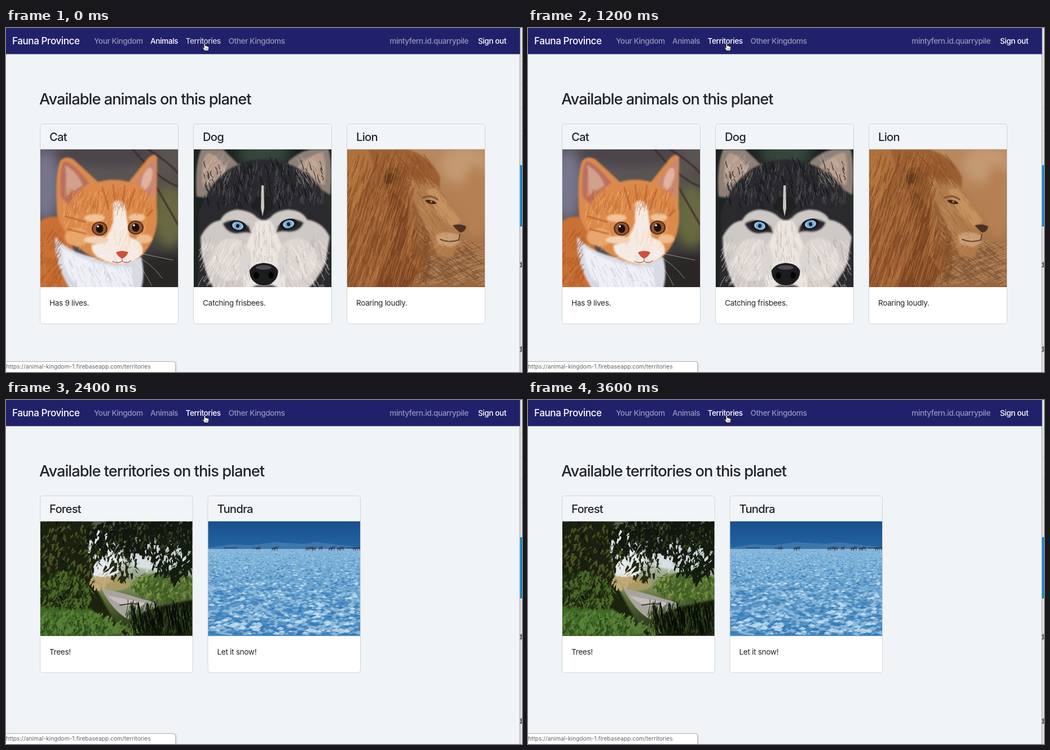
Recreate the animation shown at these times as an HTML page. Size 915x612 px, loop 3.8 s.

```html
<!DOCTYPE html>
<html lang="en">
<head>
<meta charset="utf-8">
<title>Fauna Province</title>
<style>
  html, body { margin: 0; width: 100%; height: 100%; overflow: hidden; background: #f0f4f7; }
  #stage { display: block; width: 915px; height: 612px; }
  text { font: 13.6px Inter, "Open Sans", sans-serif; font-optical-sizing: none; letter-spacing: -.32px; fill: #212529; }
  .brand { font-size: 17px; font-weight: 500; letter-spacing: -.4px; fill: #fff; }
  .nav { font-weight: 450; letter-spacing: -.42px; fill: #fff; fill-opacity: .52; }
  .nav.hover { fill-opacity: .8; }
  .nav.active { fill-opacity: 1; }
  .headline { font-size: 27.2px; font-weight: 500; letter-spacing: -.96px; }
  .title { font-size: 20.2px; font-weight: 500; letter-spacing: -.75px; }
  .status { font-size: 10.2px; letter-spacing: .02px; fill: #5f6368; }
  .line { fill: none; stroke-linecap: round; }
</style>
</head>
<body>
<svg id="stage" viewBox="0 0 915 612" xmlns="http://www.w3.org/2000/svg"></svg>
<script>
let seed = 7;
function random(min = 0, max = 1) {
  seed = (seed * 16807) % 2147483647;
  return min + (max - min) * seed / 2147483647;
}
const repeat = (count, make) => Array.from({ length: count }, (_, i) => make(i)).join('');
const round = (...values) => values.map(v => v.toFixed(1)).join(' ');

const shape = (d, fill, extra = '') => `<path d="${d}" fill="${fill}" ${extra}/>`;
const line = (d, color, width = 1, extra = '') =>
  `<path class="line" d="${d}" stroke="${color}" stroke-width="${width}" ${extra}/>`;
const oval = (x, y, rx, ry, fill, extra = '') =>
  `<ellipse cx="${x}" cy="${y}" rx="${rx}" ry="${ry}" fill="${fill}" ${extra}/>`;
const rect = (x, y, w, h, fill, extra = '') =>
  `<rect x="${x}" y="${y}" width="${w}" height="${h}" fill="${fill}" ${extra}/>`;
const text = (x, y, cls, content, extra = '') =>
  `<text x="${x}" y="${y}" class="${cls}" ${extra}>${content}</text>`;
const soft = (content, level = 1) => `<g filter="url(#soft${level})">${content}</g>`;
const gradient = (id, stops, direction = 'x2="0" y2="1"') =>
  `<linearGradient id="${id}" ${direction}>${stops.map((color, i) =>
    `<stop offset="${i / (stops.length - 1)}" stop-color="${color}"/>`).join('')}</linearGradient>`;

// Short curved hairs starting anywhere in a box
const hairs = (count, [x, y, w, h], dx, dy, color, width = 1, extra = '') =>
  line(repeat(count, () => {
    const k = random(.5, 1.2), bend = random(-4, 4);
    return `M${round(random(x, x + w), random(y, y + h))}q${round(dx * k / 2 + bend, dy * k / 2, dx * k, dy * k)}`;
  }), color, width, extra);

// Leaf-like chips scattered around the middle of an ellipse
const leaves = (count, x, y, rx, ry, size, fill) =>
  shape(repeat(count, () => {
    const a = random(0, 6.283), r = Math.sqrt(random()), s = random(.4, 1) * size;
    const b = random(0, 6.283), c = Math.cos(b) * s, d = Math.sin(b) * s;
    return `M${round(x + Math.cos(a) * r * rx, y + Math.sin(a) * r * ry)}l${round(c, d)}l${round(d, s - c)}l${round(-c - s / 2, -d)}z`;
  }), fill);

function cat() {
  const eye = (x, y) => oval(x, y, 14, 12.5, '#5b2c19') + oval(x, y, 11.5, 10.5, '#8f5836') +
    oval(x, y, 6.5, 7.5, '#1d0f0e') + oval(x - 3, y - 4, 1.8, 1.8, '#fff');
  return rect(60, 216, 245, 245, 'url(#catBack)') +
    soft(oval(70, 280, 24, 60, '#77748c') + oval(290, 335, 30, 55, '#67693f') + oval(180, 225, 95, 22, '#4c4449') +
      oval(280, 440, 60, 38, '#2b2528'), 3) +
    line('M225 216Q270 270 305 282M252 216Q290 240 305 258M268 285L305 350', '#3a2428', 4, 'opacity=".6"') +
    soft(shape('M50 352Q72 330 98 338L150 470H50Z', '#c96f34') +
      shape('M88 372Q110 400 160 408H240Q248 440 238 470H118Q84 420 88 372Z', '#d9dbe4'), 2) +
    soft(shape('M91 335Q86 262 96 237Q105 225 120 234L163 274Q190 266 218 274L250 234Q262 220 268 230L267 318Q272 358 254 388Q232 424 190 420Q118 405 91 335Z', '#dc8a4c') +
      shape('M97 300Q94 253 102 238Q113 232 148 276Q121 291 111 315Z', '#b9705e') +
      shape('M229 276Q247 246 265 233Q266 275 262 303Q248 291 229 276Z', '#c98875') +
      shape('M105 300Q108 262 105 244Q128 257 136 280Z', '#d2a08d') +
      oval(250, 268, 8, 20, '#e2b3a0', 'transform="rotate(18 250 268)"'), 2) +
    soft(shape('M190 312Q201 302 211 315L219 372Q246 380 242 401Q224 424 192 420Q148 408 152 386Q178 384 190 345Z', '#f5ebe4') +
      oval(126, 372, 22, 16, '#e8a56c') + oval(157, 338, 18, 7, '#f0c295') + oval(232, 337, 15, 7, '#f0c295') +
      oval(160, 377, 22, 7, '#f2d2b3') + oval(245, 375, 14, 8, '#eebd8d') +
      shape('M100 390Q140 418 190 424L222 426L226 465H130Q98 430 100 390Z', '#eff0f5'), 2) +
    hairs(110, [105, 296, 150, 38], 3, -15, '#bd6328', 1.3, 'opacity=".5"') +
    hairs(110, [105, 290, 145, 100], -4, 12, '#f7c38a', 1.1, 'opacity=".5"') +
    hairs(70, [62, 358, 40, 100], -8, 13, '#a4521f', 1.6, 'opacity=".55"') +
    hairs(60, [110, 405, 112, 52], 7, 15, '#bfc5d8', 1.2, 'opacity=".55"') +
    soft(line('M171 284L182 323M190 280L193 305M211 281L207 305M228 288L216 323M106 335L140 345M110 358L142 366M251 334L260 324', '#b9602b', 3.5, 'opacity=".6"') +
      eye(166, 357) + eye(230, 355)) +
    soft(shape('M195 399Q206 394 217 399Q213 408 206 410Q199 408 195 399Z', '#cf4f3a') +
      line('M206 410V415Q198 420 189 415M206 415Q214 420 221 414', '#a5685b', 1.3)) +
    line('M187 402Q145 407 116 433M188 407Q155 425 138 456M190 411Q166 437 161 459M222 401Q256 416 277 445M221 406Q245 429 258 458M224 398L296 413', '#fff', .8, 'opacity=".6"');
}

function dog() {
  const eye = (x, y, tilt) => `<g transform="rotate(${tilt} ${x} ${y})">` + oval(x, y, 16, 9.5, '#1a1a1e') +
    oval(x, y, 10, 7, '#a6cdec') + oval(x, y, 7, 7, '#6ea9dd') + oval(x, y, 3, 3.4, '#10151e') + '</g>';
  return rect(332, 216, 246, 245, '#1d2320') +
    soft(oval(457, 222, 45, 30, '#35443a') + oval(570, 340, 15, 60, '#2b332e'), 3) +
    soft(shape('M338 300Q334 245 346 216H385L419 249L365 303Z', '#8f8077') +
      shape('M350 283Q343 239 359 222Q383 231 392 260Z', '#b79b8b') +
      shape('M492 247Q514 221 540 216H572Q580 246 575 297Z', '#8f8077') +
      shape('M513 251Q542 222 562 222Q570 249 564 280Z', '#b79b8b') +
      shape('M342 330Q367 253 421 240Q457 226 501 242Q563 261 576 334V461H340Z', '#2b2b2e'), 2) +
    hairs(190, [352, 250, 212, 68], 2, -15, '#77787a', .9, 'opacity=".5"') +
    hairs(120, [352, 244, 210, 80], -4, -14, '#111216', 1.5, 'opacity=".7"') +
    hairs(45, [345, 238, 45, 45], 8, -14, '#d8c6b8', 1, 'opacity=".5"') +
    hairs(45, [520, 238, 45, 45], -8, -14, '#d8c6b8', 1, 'opacity=".5"') +
    soft(shape('M345 372Q358 345 380 342Q389 324 412 323Q436 326 445 337L457 344L469 337Q478 325 500 323Q525 324 534 341Q562 345 574 372L566 420Q550 452 530 470H372Q346 430 345 372Z', '#cfc9c5') +
      shape('M443 345Q457 338 471 345L494 400L496 470H420L421 400Z', '#ebe4df') +
      oval(400, 412, 35, 38, '#dcd6d2') + oval(516, 412, 35, 38, '#dcd6d2') +
      shape('M384 348Q404 334 431 353L435 366Q428 362 411 366Q392 366 384 348Z', '#2c2b2e') +
      shape('M482 352Q505 332 528 346Q523 362 502 363Q486 360 479 365Z', '#2c2b2e') +
      shape('M430 470Q440 452 457 458Q476 451 488 470Z', '#5d5655'), 2) +
    soft(shape('M436 318L456 338L476 318L468 300H444Z', '#202023') +
      shape('M453 280H457L458 320L455 335L452 320Z', '#c9c5c0')) +
    hairs(90, [349, 376, 70, 82], -8, 15, '#fff8f2', 1.1, 'opacity=".5"') +
    hairs(90, [499, 376, 68, 82], 8, 15, '#fff8f2', 1.1, 'opacity=".5"') +
    hairs(55, [350, 370, 215, 85], 2, 14, '#8f8a88', 1.1, 'opacity=".4"') +
    hairs(50, [437, 355, 40, 61], 0, -12, '#aba5a3', .9, 'opacity=".5"') +
    soft(eye(411, 352, 12) + eye(501, 349, -12)) +
    soft(shape('M432 431Q439 419 457 418Q476 419 482 431Q484 445 470 455Q457 461 445 455Q431 447 432 431Z', '#1c1c1f') +
      oval(457, 426, 14, 4, '#4d494d') + oval(444, 440, 5, 6, '#050506') + oval(470, 440, 5, 6, '#050506'));
}

function lion() {
  return rect(604, 216, 246, 245, 'url(#lionBack)') +
    soft(oval(815, 245, 45, 32, '#c49a72') + oval(834, 308, 26, 65, '#b58053') + oval(778, 439, 90, 35, '#98683f'), 3) +
    hairs(150, [710, 385, 140, 73], 24, -9, '#d0a171', 1.6, 'opacity=".45"') +
    hairs(110, [715, 392, 135, 66], -18, -13, '#65442d', 1.8, 'opacity=".45"') +
    soft(shape('M594 216H711Q752 226 770 266L767 316L746 353L750 397L722 461H594Z', '#9c5e31') +
      shape('M604 216H643L653 248L628 309L610 349L604 368Z', '#ad6f3b') +
      shape('M671 266L714 325L709 401L732 435L712 461H657L690 363Z', '#834b26'), 2) +
    soft(shape('M712 269Q746 258 766 282L783 303L813 347Q820 354 814 364L806 370L805 381L796 393L794 406Q779 413 765 402L739 408Q715 375 718 329Z', '#b07a4b') +
      shape('M745 288L761 285L781 307L807 344L791 354L763 329Z', '#c4915f') +
      shape('M762 368Q784 358 804 370L803 382L789 390L766 384Z', '#c99e74') +
      shape('M719 300Q742 349 766 404L735 408Q709 365 719 300Z', '#965f36') +
      oval(678, 268, 24, 18, '#8a5429', 'transform="rotate(-30 678 268)"') +
      oval(680, 268, 12, 9, '#63391f', 'transform="rotate(-30 680 268)"'), 2) +
    soft(hairs(250, [604, 225, 125, 230], -13, 38, '#6e3c1d', 1.6, 'opacity=".5"') +
      hairs(220, [614, 218, 118, 230], -10, 34, '#c98a50', 1.3, 'opacity=".5"') +
      hairs(80, [700, 240, 60, 45], -12, -16, '#8a5229', 1.5, 'opacity=".7"') +
      hairs(70, [722, 350, 30, 85], -5, 22, '#7a4622', 1.6, 'opacity=".55"')) +
    hairs(110, [725, 296, 50, 90], 10, 13, '#d9a878', .8, 'opacity=".4"') +
    hairs(70, [728, 290, 55, 95], 8, 12, '#7f502d', .9, 'opacity=".4"') +
    soft(shape('M743 307Q755 303 764 312Q751 316 743 307Z', '#3b271b') + oval(754, 309, 2, 2, '#a37a45') +
      line('M739 302Q753 296 765 305', '#805433', 3) +
      shape('M792 351Q806 347 816 353Q815 363 805 364Q798 358 792 351Z', '#4a3226') +
      line('M805 367L803 377Q787 383 770 376', '#65432e', 2)) +
    line('M781 370L742 386M783 374L748 398M789 375L763 401', '#e4bf94', .7, 'opacity=".5"');
}

function forest() {
  return rect(60, 216, 271, 204, 'url(#forestBack)') +
    soft(oval(172, 285, 36, 32, '#e7e9ed') + oval(266, 277, 55, 25, '#d9e0e3') + oval(285, 331, 62, 24, '#5d7635') +
      oval(188, 327, 32, 13, '#aa9a62'), 2) +
    leaves(270, 285, 330, 55, 27, 7, '#3f5e26') + leaves(120, 278, 329, 55, 22, 5, '#7d9446') +
    soft(shape('M169 335Q205 342 241 354Q274 361 266 370Q243 381 216 390Q187 373 169 335Z', '#aaa4a0') +
      shape('M180 348Q220 356 251 361L235 369Q200 368 180 348Z', '#c5bebb')) +
    line('M202 365L223 362L235 363', '#3e3a38', 2) +
    soft(shape('M60 216H154L145 268L157 329L173 359L205 419H60Z', '#1b2411'), 2) +
    line('M92 216Q111 279 94 374M98 292Q159 226 229 234M154 240Q231 249 331 219', '#0d100a', 8) +
    leaves(560, 110, 260, 68, 50, 9, '#19200f') + leaves(780, 248, 238, 98, 33, 9, '#11180f') +
    leaves(230, 298, 278, 38, 42, 9, '#141c10') + leaves(95, 207, 293, 28, 28, 7, '#242a14') +
    leaves(190, 112, 270, 58, 52, 6, '#4a5222') + leaves(130, 246, 239, 85, 25, 5, '#37391c') +
    leaves(45, 168, 267, 27, 34, 5, '#e0e5e9') + leaves(75, 267, 278, 48, 24, 5, '#cad2d4') +
    leaves(230, 105, 344, 50, 38, 8, '#4c6828') + leaves(150, 100, 342, 54, 37, 6, '#243c14') +
    leaves(65, 168, 319, 20, 12, 6, '#c4a978') +
    soft(shape('M201 419L225 385L269 368L331 355V419Z', '#131b0d') +
      shape('M60 369Q113 377 150 371L211 419H60Z', '#406725'), 2) +
    leaves(330, 122, 399, 83, 24, 7, '#598137') + leaves(170, 110, 401, 75, 20, 5, '#2b4b1b') +
    leaves(70, 215, 406, 25, 14, 6, '#587b35') +
    hairs(160, [209, 378, 120, 41], 4, -25, '#354a20', 1.1) + hairs(95, [225, 384, 105, 35], -4, -25, '#080d06', 1.5);
}

function tundra() {
  // Ice chips grow towards the viewer
  const ice = (count, fill, opacity) => shape(repeat(count, () => {
    const depth = random() ** 1.15, s = 1 + depth * 6 * random(.4, 1.2);
    return `M${round(random(353, 629), 267 + depth * 151)}l${round(s * 1.2, -s * .7)}l${round(s * 1.1, s * .45)}l${round(-s * .6, s * .5)}z`;
  }), fill, `opacity="${opacity}"`);
  const deer = (x, y) => oval(x, y, 3, 1.6, '#343e56') +
    line(`M${x - 2} ${y}v4m4 -4v4m0 -4l2 -3`, '#343e56', 1);
  return rect(358, 216, 271, 204, 'url(#tundraSky)') +
    shape('M358 263L398 257L438 258L475 253L528 256L551 253L629 262V268H358Z', '#3f76ac') +
    rect(358, 265, 271, 155, 'url(#tundraSnow)') +
    ice(1000, '#3d7fb9', .6) + ice(1150, '#b3d6ec', .6) + ice(450, '#286eae', .55) + ice(300, '#d9edf8', .7) +
    line('M387 263H410M438 264H452M604 263H629', '#315174', 2) +
    [447, 474, 479, 534, 541, 546, 558, 575, 580, 590, 596, 618, 625].map((x, i) => deer(x, 263 + i % 2)).join('');
}

function card(x, width, photoHeight, title, caption, photo) {
  const bottom = 216 + photoHeight;
  return rect(x + .5, 170.5, width - 1, bottom - 170 + 65, '#fff', 'rx="4.5"') +
    shape(`M${x + 1} 216V175q0-4 4-4h${width - 10}q4 0 4 4v41z`, '#f2f5f8') +
    rect(x, 215, width, 1, '#d5dcdf') +
    `<svg x="${x + .5}" y="216" width="${width - 1}" height="${photoHeight}" viewBox="${x + .5} 216 ${width - 1} ${photoHeight}">${photo()}</svg>` +
    rect(x + .5, 170.5, width - 1, bottom - 170 + 65, 'none', 'rx="4.5" stroke="#ccd4d8"') +
    text(x + 17, 201, 'title', title) + text(x + 17, bottom + 33, '', caption);
}

const defs = `<defs>
  ${[.6, 1.8, 9].map((blur, i) => `<filter id="soft${i + 1}" x="-20%" y="-20%" width="140%" height="140%"><feGaussianBlur stdDeviation="${blur}"/></filter>`).join('')}
  ${gradient('catBack', ['#5d5765', '#5a5550', '#353337'], 'x2=".7" y2="1"')}
  ${gradient('lionBack', ['#b7885f', '#b27d50', '#8b5c38'])}
  ${gradient('forestBack', ['#4a5740', '#c6cec8', '#5e743b', '#18220f'])}
  ${gradient('tundraSky', ['#194f8d', '#2466a7', '#2466a7', '#2466a7', '#2466a7'])}
  ${gradient('tundraSnow', ['#86b8dc', '#70a8d2', '#5d99c9', '#4287c0'])}
  ${gradient('edge', ['#a9acb3', '#deddde'], 'x2="1" y2="0"')}
</defs>`;

const windowEdge = rect(911, 0, 4, 612, '#e7e5e4') + rect(910.5, 0, 2.5, 612, 'url(#edge)') +
  [59, 100, 141, 182].map(y => rect(912, y, 3, 1, '#c9c6c4')).join('') +
  rect(911.5, 244, 3.5, 109, '#1683c6') +
  `<svg x="911" y="400" width="4" height="200" viewBox="911 400 4 200">${text(907, 426, '', 'd')}${text(907, 576, '', 'd')}</svg>`;

const navbar = rect(0, 0, 911.5, 46.5, '#21216b') +
  text(11, 29, 'brand', 'Fauna Province') +
  text(156, 28, 'nav', 'Your Kingdom') +
  text(256, 28, 'nav', 'Animals', 'id="animalsLink"') +
  text(318.5, 28, 'nav', 'Territories', 'id="territoriesLink"') +
  text(394.5, 28, 'nav', 'Other Kingdoms') +
  text(820, 28, 'nav', 'mintyfern.id.quarrypile', 'text-anchor="end"') +
  text(837, 28, 'nav active', 'Sign out');

const status = rect(-4, 594, 305.5, 24, '#000', 'rx="4" opacity=".25" filter="url(#soft2)"') +
  rect(-4, 593.5, 304.5, 24, '#fff', 'rx="4" stroke="#b4b7b9"') +
  text(0, 606, 'status', 'https://animal-kingdom-1.firebaseapp.com/territories');

const pointer = shape('M351 36V28.5Q351 27 352.2 27Q353.4 27 353.4 28.5V32Q354.8 31 355.8 32.3Q357 31.7 357.9 33Q359.7 32.6 359.8 34.5V37L358.4 40.5H352.5L348.7 35.8Q348 34.4 349.2 34.2Q350.3 34.5 351 36Z',
  '#fff', 'stroke="#111" stroke-width=".9"') + line('M354 36V39M356 36V39M358 36V38.5', '#333', .6);

document.getElementById('stage').innerHTML = defs + rect(0, 0, 915, 612, '#f0f4f7') + windowEdge + navbar +
  `<g id="animalsPage">${text(59, 136, 'headline', 'Available animals on this planet') +
    card(60, 246, 245, 'Cat', 'Has 9 lives.', cat) +
    card(332, 246, 245, 'Dog', 'Catching frisbees.', dog) +
    card(604, 246, 245, 'Lion', 'Roaring loudly.', lion)}</g>` +
  `<g id="territoriesPage">${text(59, 136, 'headline', 'Available territories on this planet') +
    card(60, 271.5, 203.5, 'Forest', 'Trees!', forest) +
    card(357.5, 271.5, 203.5, 'Tundra', 'Let it snow!', tundra)}</g>` +
  status + pointer;

const LOOP = 3800, CLICK = 1200, PAGE_CHANGE = 1400;
const [animalsPage, territoriesPage, animalsLink, territoriesLink] =
  ['animalsPage', 'territoriesPage', 'animalsLink', 'territoriesLink'].map(id => document.getElementById(id));
const start = performance.now();

function render() {
  const time = (performance.now() - start) % LOOP;
  const clicked = time >= CLICK, changed = time >= PAGE_CHANGE;
  animalsLink.setAttribute('class', clicked ? 'nav' : 'nav active');
  territoriesLink.setAttribute('class', clicked ? 'nav active' : 'nav hover');
  animalsPage.style.display = changed ? 'none' : '';
  territoriesPage.style.display = changed ? '' : 'none';
  requestAnimationFrame(render);
}
render();
</script>
</body>
</html>
```
